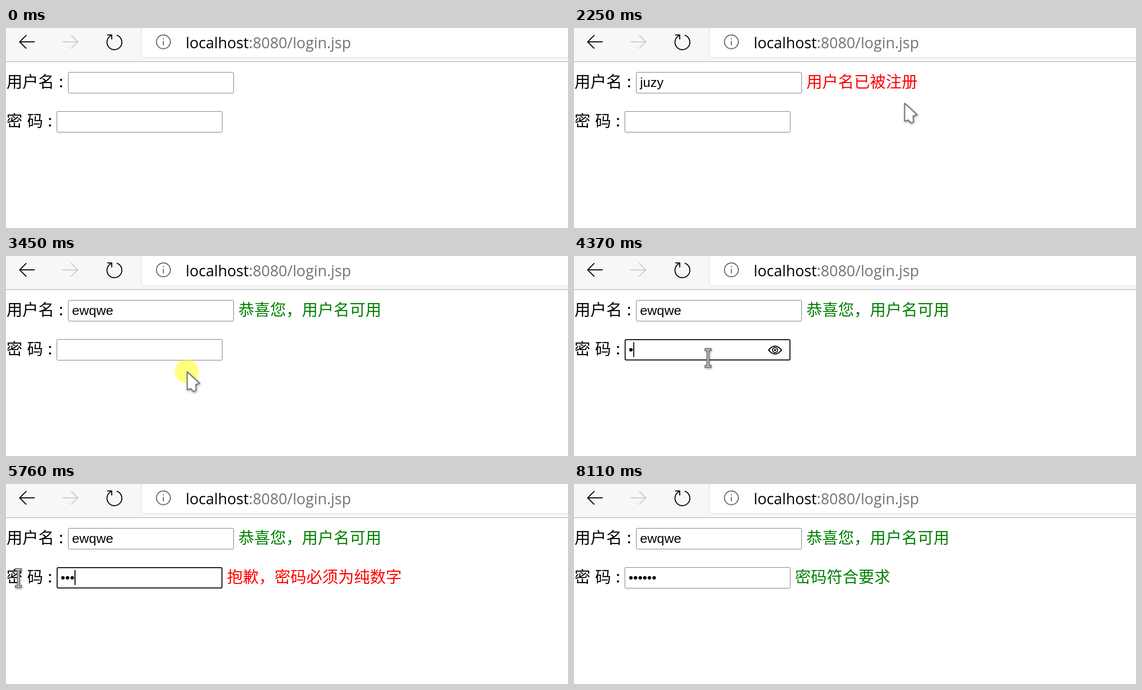
Recreate the animation shown at these times as an HTML page. Size 1132 by 404 pixels, loop 8.49 s.

```html
<!DOCTYPE html>
<html lang="zh-CN">
<head>
<meta charset="utf-8">
<style>
html, body { margin: 0; width: 100%; height: 100%; overflow: hidden; background: #fff }
svg { display: block; width: 1132px; height: 404px }
.line { fill: none; stroke: #000; stroke-width: 2 }
.cjk { font: 32px "Noto Sans CJK SC", "Noto Sans CJK", sans-serif; word-spacing: 2.4px }
.url { font: 30.3px "Open Sans", "Noto Sans", sans-serif }
.value { font: 26.67px "Liberation Sans", Arial, sans-serif }
.soft { filter: drop-shadow(1px 2px 2px #0005) }
</style>
</head>
<body>
<svg viewBox="0 0 1132 404">
  <rect width="1132" height="68" fill="#f7f7f7"/>
  <rect x="274" y="-10" width="880" height="69" rx="6" fill="#fff" style="filter:drop-shadow(0 0 2px #0002)"/>
  <rect y="67" width="1132" height="2" fill="#cecece"/>
  <path class="line" d="M58 28H28M41 14.5L27.5 28L41 41.5"/>
  <path class="line" style="stroke:#ccc" d="M114 28H144M131 14.5L144.5 28L131 41.5"/>
  <path class="line" d="M223 14.5A15 15 0 1 1 212 15.2M204 14H213V23"/>
  <circle class="line" cx="317" cy="28" r="14" style="stroke:#666"/>
  <path class="line" style="stroke:#666" d="M317 20.5V23M317 26V35"/>
  <text class="url" x="362" y="41">localhost<tspan fill="#6f7570">:8080/login.jsp</tspan></text>

  <text class="cjk" x="1" y="119.5">用户名 :</text>
  <text class="cjk" x="1" y="198.5">密 码 :</text>
  <g id="fields"></g>
  <g id="eye" class="line">
    <path d="M392 190Q405 174 418 190Q405 206 392 190Z"/>
    <circle cx="405" cy="190" r="5"/>
    <circle cx="405" cy="190" r="1"/>
  </g>
  <rect id="caret" width="2" height="30"/>

  <g id="pointer">
    <circle id="press" r="24" fill="#ff0" opacity=".5"/>
    <path id="arrow" class="soft" d="M1 1V37L8 35L14 41L19 38L18 27L26 24Z" fill="#fff" stroke="#7c8080" stroke-width="2.5" stroke-linejoin="round"/>
    <g id="beam" class="soft" fill="none">
      <path d="M-7 -17H7M0 -17V17M-7 17H7" stroke="#747878" stroke-width="6"/>
      <path d="M-5 -17H5M0 -17V17M-5 17H5" stroke="#c4c8c8" stroke-width="2"/>
    </g>
  </g>
</svg>
<script>
const LOOP = 8490, STEP = 75;
const $ = id => document.getElementById(id);
const show = (el, on) => el.style.display = on ? '' : 'none';
const set = (el, attrs) => { for (const k in attrs) el.setAttribute(k, attrs[k]); };

function make(tag, attrs) {
  const el = document.createElementNS('http://www.w3.org/2000/svg', tag);
  set(el, attrs);
  return $('fields').appendChild(el);
}

// One input box with its selection, value and the note to its right
function field(x, y) {
  return {
    x, y,
    box: make('rect', { rx: 2, fill: '#fff' }),
    mark: make('rect', { x: x + 8, y: y + 6, height: 30, fill: '#0078d7' }),
    value: make('text', { class: 'value', x: x + 8, y: y + 30 }),
    note: make('text', { class: 'cjk', x: x + 343, y: y + 30.5 })
  };
}
const user = field(125, 89), pass = field(102, 168);

const TAKEN = ['用户名已被注册', 'red'], FREE = ['恭喜您，用户名可用', 'green'];
const BAD = ['抱歉，密码必须为纯数字', 'red'], GOOD = ['密码符合要求', 'green'];

const start = { name: '', dots: 0, nameNote: ['', 'red'], passNote: ['', 'red'], focus: null, marked: false, eye: false };
const events = [
  [460, { focus: user }],
  [2175, { focus: null, nameNote: TAKEN }],
  [2760, { focus: user }],
  [2885, { marked: true }],
  [3450, { focus: null, nameNote: FREE }],
  [3840, { focus: pass }],
  [4370, { dots: 1, eye: true }],
  [4450, { dots: 2 }],
  [4520, { dots: 3 }],
  [4680, { focus: null, eye: false, passNote: BAD }],
  [5230, { focus: pass }],
  [5385, { marked: true }],
  [5610, { dots: 1, marked: false }],
  [5690, { dots: 2 }],
  [5760, { dots: 3 }],
  [5990, { dots: 4 }],
  [6390, { dots: 5 }],
  [6460, { dots: 6 }],
  [6700, { focus: null, passNote: GOOD }]
];
function type(word, times) {
  times.forEach((t, i) => events.push([t, { name: word.slice(0, i + 1), marked: false }]));
}
type('juzy', [1080, 1240, 1325, 1410]);
type('ewqwe', [2960, 3030, 3100, 3170, 3240]);
events.sort((a, b) => a[0] - b[0]);

// Pointer keys: time, shape (a = arrow, i = text beam, '' = hidden), x, y
const path = [
  [0, ''], [70, 'a', 457, 185], [130, 'i', 240, 108], [780, ''],
  [1950, 'i', 240, 108], [2025, 'i', 415, 108], [2100, 'a', 545, 150], [2175, 'a', 665, 151],
  [2255, 'a', 665, 151], [2550, 'i', 400, 110], [2700, 'i', 200, 106], [2760, 'i', 200, 106],
  [2960, 'i', 22, 102], [3110, 'i', 22, 102], [3240, 'a', 122, 165], [3310, 'i', 320, 190],
  [3450, 'a', 364, 233], [3600, 'a', 364, 233], [3680, 'i', 320, 190], [3840, 'i', 225, 185],
  [3910, 'i', 225, 185], [3990, 'i', 270, 206], [4600, 'i', 270, 206], [4680, 'a', 345, 245],
  [4935, 'a', 345, 245], [5160, 'i', 200, 185], [5230, 'i', 200, 181], [5460, 'i', 25, 190],
  [6070, 'i', 25, 190], [6240, 'a', 37, 188], [6460, 'a', 37, 188], [6540, 'a', 60, 220],
  [6620, 'a', 125, 255], [6700, 'a', 290, 320], [6775, 'a', 352, 329], [6850, 'a', 382, 279],
  [6960, 'a', 382, 279], [7100, 'a', 426, 323], [7190, 'a', 426, 323], [7490, 'a', 434, 313],
  [7565, 'a', 434, 313], [7640, 'a', 477, 335], [8040, 'a', 1016, 375], [8110, ''], [LOOP, '']
];
const presses = [[460, 540], [2175, 2250], [2760, 2960], [3450, 3520], [3840, 3910], [4680, 4750], [5230, 5460], [6700, 6775]];

// The pointer travels between keys in even jumps
function pointerAt(t) {
  const i = path.findIndex(k => k[0] > t);
  const [t0, shape, x0, y0] = path[i - 1], [t1, next, x1, y1] = path[i];
  if (!shape || !next) return { shape, x: x0 || 0, y: y0 || 0 };
  const n = Math.max(1, Math.round((t1 - t0) / STEP));
  const u = Math.floor((t - t0) / (t1 - t0) * n) / n;
  return { shape, x: x0 + (x1 - x0) * u, y: y0 + (y1 - y0) * u };
}

function drawField(f, text, [note, color], state, p) {
  const focused = state.focus === f, marked = focused && state.marked;
  const over = p.shape === 'i' && p.x > f.x && p.x < f.x + 334 && p.y > f.y && p.y < f.y + 43;
  const w = focused ? 2 : 1;
  set(f.box, {
    x: f.x + w / 2, y: f.y + w / 2, width: 334 - w, height: 43 - w,
    'stroke-width': w, stroke: focused ? '#101010' : over ? '#4f4f4f' : '#767676'
  });
  f.value.textContent = text;
  f.value.setAttribute('fill', marked ? '#fff' : '#000');
  f.note.textContent = note;
  f.note.setAttribute('fill', color);
  const length = text ? f.value.getComputedTextLength() : 0;
  f.mark.setAttribute('width', marked ? length : 0);
  if (focused) set($('caret'), { x: f.x + 8 + length, y: f.y + 6 });
}

function draw(now) {
  const t = now % LOOP;
  const state = Object.assign({}, start, ...events.filter(e => e[0] <= t).map(e => e[1]));
  const p = pointerAt(t);
  drawField(user, state.name, state.nameNote, state, p);
  drawField(pass, '•'.repeat(state.dots), state.passNote, state, p);
  show($('caret'), state.focus && !state.marked);
  show($('eye'), state.eye);
  set($('pointer'), { transform: `translate(${p.x} ${p.y})` });
  show($('arrow'), p.shape === 'a');
  show($('beam'), p.shape === 'i');
  show($('press'), presses.some(([a, b]) => t >= a && t < b));
}

const begin = performance.now();
function tick() {
  draw(performance.now() - begin);
  requestAnimationFrame(tick);
}
tick();
</script>
</body>
</html>
```
